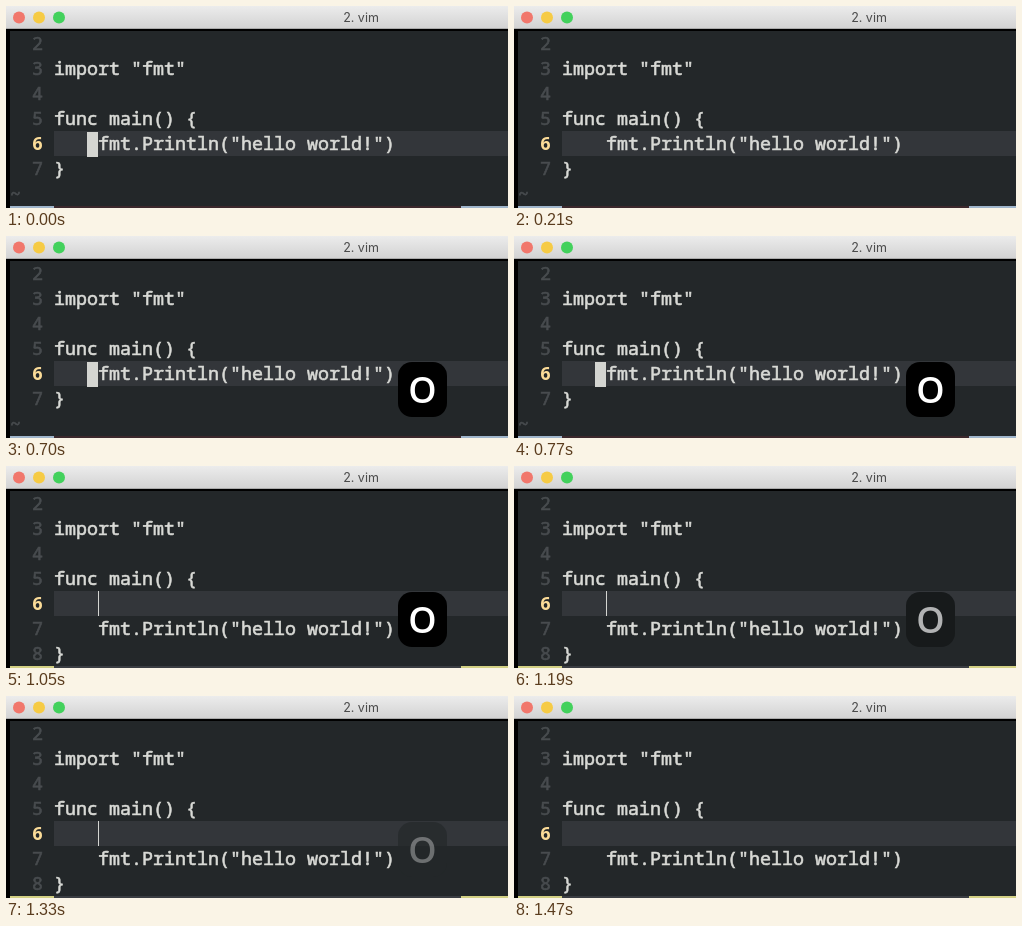
Recreate the animation shown at these times as an HTML page. Size 502x202 px, loop 1.54 s.

```html
<!DOCTYPE html>
<html lang="en">
<head>
<meta charset="utf-8">
<title>vim</title>
<style>
  html, body { margin: 0; width: 100%; height: 100%; overflow: hidden; background: #000; }
  svg { display: block; width: 502px; height: 202px; }
  .code { font: 18.333px "Noto Sans Mono", "DejaVu Sans Mono", monospace; }
  .code text { fill: #d9dad6; stroke: #d9dad6; stroke-width: .6px; }
  .code .num { fill: #484c4f; stroke: #484c4f; }
  .code .now { fill: #fbdc98; stroke: none; font-weight: 700; }
  .title { font: 12.5px Inter, Roboto, sans-serif; fill: #4b4b4b; }
  .key { font: 600 36px "Open Sans", "Noto Sans", sans-serif; fill: #fff; }
</style>
</head>
<body>
<svg viewBox="0 0 502 202">
  <defs>
    <linearGradient id="bar" x2="0" y2="1">
      <stop stop-color="#ececec"/>
      <stop offset="1" stop-color="#d3d3d3"/>
    </linearGradient>
  </defs>
  <rect width="502" height="202"/>
  <rect width="502" height="22" fill="url(#bar)"/>
  <rect y="22" width="502" height="1" fill="#aaa"/>
  <circle cx="13" cy="11.5" r="6" fill="#f1776c"/>
  <circle cx="33" cy="11.5" r="6" fill="#f6cb45"/>
  <circle cx="53" cy="11.5" r="6" fill="#43d15c"/>
  <text class="title" x="355" y="16" text-anchor="middle">2. vim</text>

  <rect x="4" y="25" width="498" height="177" fill="#232729"/>
  <rect x="48" y="125" width="454" height="25" fill="#33363a"/>
  <g id="code" class="code"></g>
  <rect id="cursor" fill="#d4d5d1"/>
  <rect id="ends" x="4" y="200" width="498" height="2"/>
  <rect id="middle" x="48" y="200" width="407" height="2"/>

  <rect id="box" x="392" y="126" width="49" height="55" rx="14"/>
  <text id="key" class="key" x="416.5" y="167" text-anchor="middle">O</text>
</svg>
<script>
const LOOP = 1540, STEP = 70;
const INSERT = 840, FADE = 1050, FADE_TIME = 420;
const get = id => document.getElementById(id);
const set = (id, attrs) => {
  for (const name in attrs) get(id).setAttribute(name, attrs[name]);
};

const call = 'fmt.Println("hello world!")';
const head = ["", 'import "fmt"', "", "func main() {"];
const before = [...head, "\t" + call, "}"];
const after = [...head, "", "\t" + call, "}"];

function text(x, y, str, cls = "") {
  return `<text x="${x}" y="${y}" class="${cls}">${str}</text>`;
}

function listing(lines) {
  let out = "";
  lines.forEach((line, i) => {
    const y = 44 + 25 * i, n = i + 2;
    out += text(26, y, n, n === 6 ? "now" : "num");
    out += text(line[0] === "\t" ? 92 : 48, y, line.trim());
  });
  return lines.length < 7 ? out + text(4, 194, "~", "num") : out;
}

let mode;
function setMode(insert) {
  if (mode === insert) return;
  mode = insert;
  get("code").innerHTML = listing(insert ? after : before);
  set("ends", { fill: insert ? "#d2d083" : "#9fb5cb" });
  set("middle", { fill: insert ? "#3a3d42" : "#3c282c" });
  set("cursor", insert
    ? { x: 92, y: 125, width: 1, height: 25 }
    : { x: 81, y: 126, width: 11, height: 25 });
}

function draw(now) {
  const t = Math.floor(now % LOOP / STEP) * STEP;
  setMode(t >= INSERT);
  const cursorOn = t < 210 || (t >= 700 && t < 1400);
  const left = Math.min(1, Math.max(0, 1 - (t - FADE) / FADE_TIME));
  const shown = t < 700 ? 0 : left;
  // The box first lightens to the page colour, then turns clear.
  const light = Math.min(1, 2 - 2 * shown);
  const fill = `rgb(${[35, 39, 41].map(c => Math.round(c * light))})`;
  set("cursor", { opacity: cursorOn ? 1 : 0 });
  set("box", { fill, opacity: Math.min(1, 2 * shown) });
  set("key", { opacity: shown });
  requestAnimationFrame(draw);
}
draw(performance.now());
</script>
</body>
</html>
```
